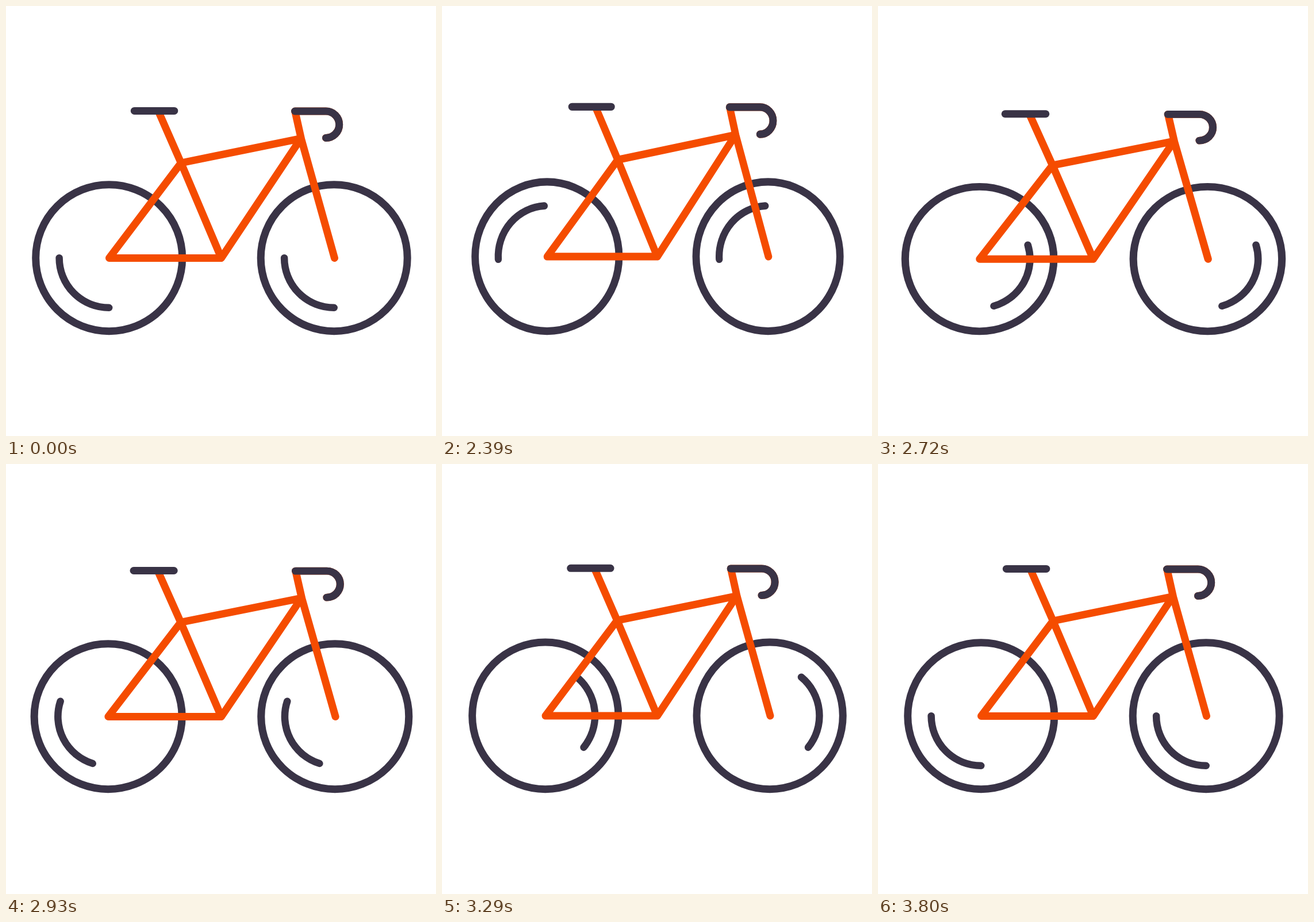
Write an HTML page that moves like this. It is 748x748 px and loops after 3.83 s.

```html
<!DOCTYPE html>
<html lang="en">
<head>
<meta charset="utf-8">
<title>Bicycle</title>
<style>
  html, body { margin: 0; width: 100%; height: 100%; overflow: hidden; background: #fff; }
  svg { display: block; width: 100%; height: 100%; }
  #bike { fill: none; stroke: #393346; stroke-width: 13; stroke-linecap: round; stroke-linejoin: round; }
  .frame { stroke: #f54c00; }
</style>
</head>
<body>
<svg viewBox="0 0 748 748">
  <defs>
    <g id="wheel">
      <circle r="127.5"/>
      <path class="shine" d="M-86.6 0A86.6 86.6 0 0 0 0 86.6" stroke-width="12.5"/>
    </g>
    <path id="bar" d="M502.5 183H556.5A23.2 23.2 0 0 1 556.5 229.4"/>
  </defs>
  <g id="bike">
    <g class="wheel" transform="translate(179.2 438.2)">
      <circle r="127.5"/>
      <path class="shine" d="M-86.6 0A86.6 86.6 0 0 0 0 86.6" stroke-width="12.5"/>
    </g>
    <g class="wheel" transform="translate(570.7 438.2)">
      <circle r="127.5"/>
      <path class="shine" d="M-86.6 0A86.6 86.6 0 0 0 0 86.6" stroke-width="12.5"/>
    </g>
    <g class="frame">
      <path d="M265.5 184L304.5 273L374.5 438.4H179.5L304.5 273L513 230.5L374.5 438.4"/>
      <path d="M503 184L513.5 231L571.5 438.4"/>
      <use href="#bar"/>
    </g>
    <path d="M223.3 182.4H292.8"/>
    <use href="#bar"/>
  </g>
</svg>
<script>
const LOOP = 3830, REST = 2030, STEP = 30, STEPS = 60;
const PIVOT = [374.8, 572];
// [step, stretch]: +1 is tallest, -1 is flattest
const BOUNCE = [[0, 0], [4, 0], [15, 1], [27, -1], [38, 1], [49, -1], [60, 0]];

const bike = document.getElementById("bike");
const shines = document.querySelectorAll(".wheel .shine");
const ease = x => x * x * (3 - 2 * x);

function stretchAt(n) {
  const k = Math.max(1, BOUNCE.findIndex(([s]) => s >= n));
  const [s0, v0] = BOUNCE[k - 1], [s1, v1] = BOUNCE[k];
  return v0 + (v1 - v0) * ease((n - s0) / (s1 - s0));
}

function draw(time) {
  const t = time % LOOP;
  const n = t < REST ? 0 : Math.min(STEPS, Math.floor((t - REST) / STEP) + 1);
  const d = 0.02 * stretchAt(n);
  const [x, y] = PIVOT;
  bike.setAttribute("transform",
    `translate(${x} ${y}) scale(${1 - d} ${1 + d}) translate(${-x} ${-y})`);
  const turn = `rotate(${720 * ease(n / STEPS)})`;
  shines.forEach(s => s.setAttribute("transform", turn));
}

const start = performance.now();
function tick() {
  draw(performance.now() - start);
  requestAnimationFrame(tick);
}
tick();
</script>
</body>
</html>
```
